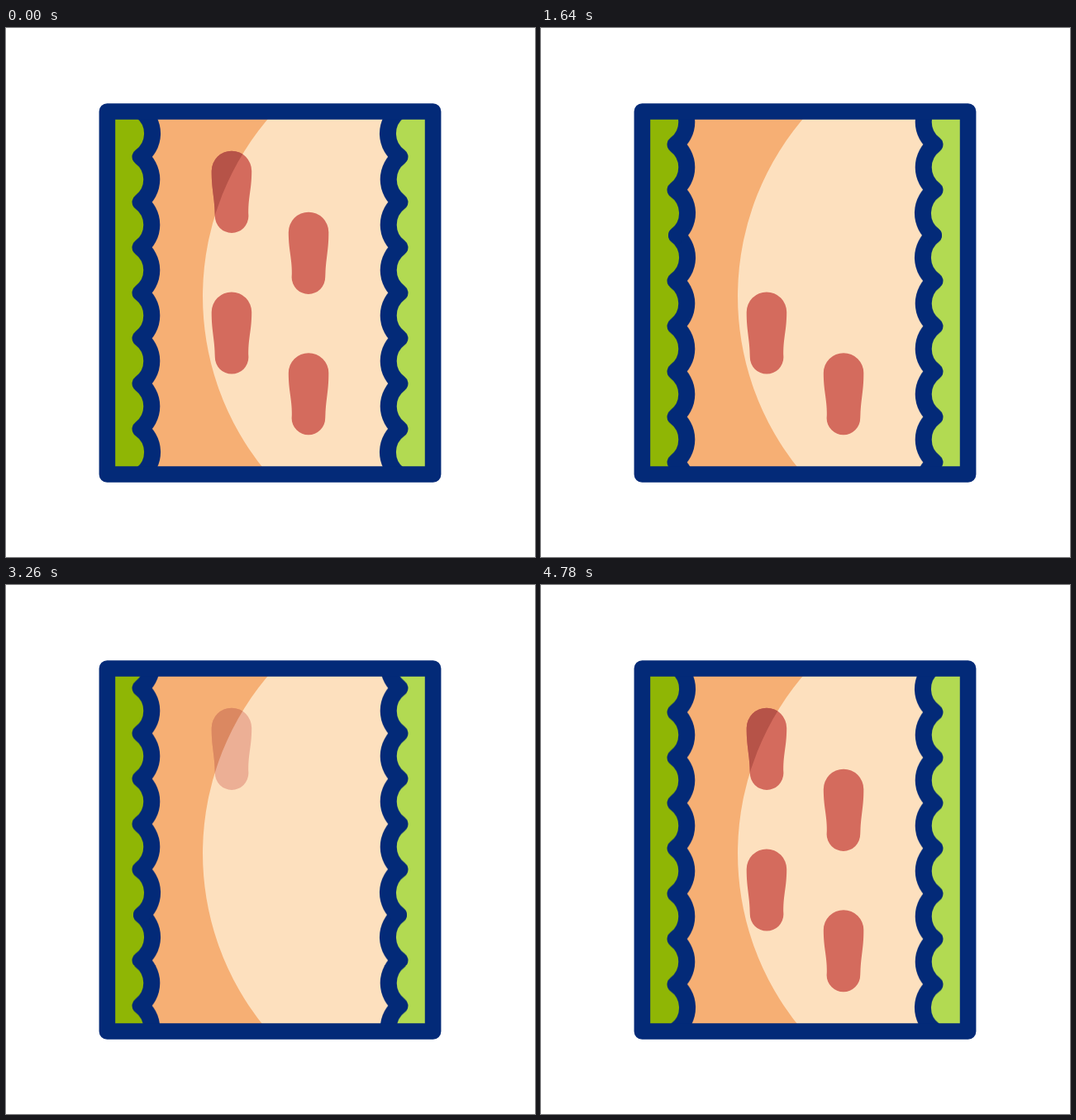
An HTML page that plays this animation: 640 by 640 pixels, repeating every 4.8 s.

```html
<!DOCTYPE html>
<html lang="en">
<head>
<meta charset="utf-8">
<title>Footprints on a path</title>
<style>
  html, body { margin: 0; width: 100%; height: 100%; overflow: hidden; background: #fff; }
  svg { display: block; width: 100%; height: 100%; }

  .hedge { animation: scroll 4.8s linear infinite; }
  .foot { fill: #d46b5d; animation: 4.8s linear infinite; }
  .first { animation-name: first; }
  .second { animation-name: second; }
  .third { animation-name: third; }
  .fourth { animation-name: fourth; }

  @keyframes scroll {
    from { transform: translateY(0); }
    to { transform: translateY(439.2px); }
  }
  @keyframes first {
    0%, 3.33%, 28.75%, 45%, 77.5%, 100% { opacity: 1; }
    8.33%, 23.75%, 50%, 72.5% { opacity: 0; }
  }
  @keyframes second {
    0%, 8.75%, 33.96%, 50%, 85%, 100% { opacity: 1; }
    13.75%, 29.17%, 55%, 80% { opacity: 0; }
  }
  @keyframes third {
    0%, 14.17%, 42.08%, 57.5%, 93.33%, 100% { opacity: 1; }
    19.17%, 37.08%, 62.5%, 88.33% { opacity: 0; }
  }
  @keyframes fourth {
    0%, 20.4%, 46.25%, 65%, 99.6%, 100% { opacity: 1; }
    25.4%, 41.25%, 70%, 94.6% { opacity: 0; }
  }
</style>
</head>
<body>
<svg viewBox="0 0 640 640">
  <defs>
    <path id="shade" d="M324.8 101A332 332 0 0 0 317.2 540H122V101z"/>
    <path id="sole" d="M248.7 173A24.25 24.25 0 0 1 297.2 173C297.2 197 292.6 205 293.4 227.6
      A20.3 20.3 0 0 1 252.8 227.6C252.6 205 248.7 197 248.7 173z"/>
    <path id="tile" d="M164 0a34.2 34.2 0 0 1-1.5 54.9 34.2 34.2 0 0 1 0 54.9 34.2 34.2 0 0 1 0 54.9
      34.2 34.2 0 0 1 0 54.9 34.2 34.2 0 0 1 0 54.9 34.2 34.2 0 0 1 0 54.9
      34.2 34.2 0 0 1 0 54.9 34.2 34.2 0 0 1 1.5 54.9"/>
    <!-- two tiles, one above the other, for a seamless scroll -->
    <g id="scallops" stroke="#032a78" stroke-width="20" stroke-linecap="round" stroke-linejoin="round">
      <use href="#tile" y="100.7"/>
      <use href="#tile" y="-338.5"/>
    </g>
    <path id="bank" d="M122 101h43v439h-43z"/>
    <clipPath id="inside"><path d="M122 101h395v439H122z"/></clipPath>
    <clipPath id="dark"><use href="#shade"/></clipPath>
  </defs>

  <g clip-path="url(#inside)">
    <path d="M122 101h395v439H122z" fill="#fde0be"/>
    <use href="#shade" fill="#f6af74"/>

    <g fill="#8fb605">
      <g class="foot fourth">
        <use href="#sole"/>
        <g clip-path="url(#dark)"><use href="#sole" fill="#b65348"/></g>
      </g>
      <g class="foot second"><use href="#sole" y="170.7"/></g>
      <use href="#bank"/>
      <g class="hedge"><use href="#scallops"/></g>
    </g>

    <g fill="#b2da52" transform="matrix(-1 0 0 1 639 0)">
      <g class="foot third"><use href="#sole" y="74"/></g>
      <g class="foot first"><use href="#sole" y="244.4"/></g>
      <use href="#bank"/>
      <g class="hedge"><use href="#scallops"/></g>
    </g>
  </g>

  <path d="M122.4 101h394.2v439H122.4z" fill="none" stroke="#032a78" stroke-width="19.6" stroke-linejoin="round"/>
</svg>
</body>
</html>
```
